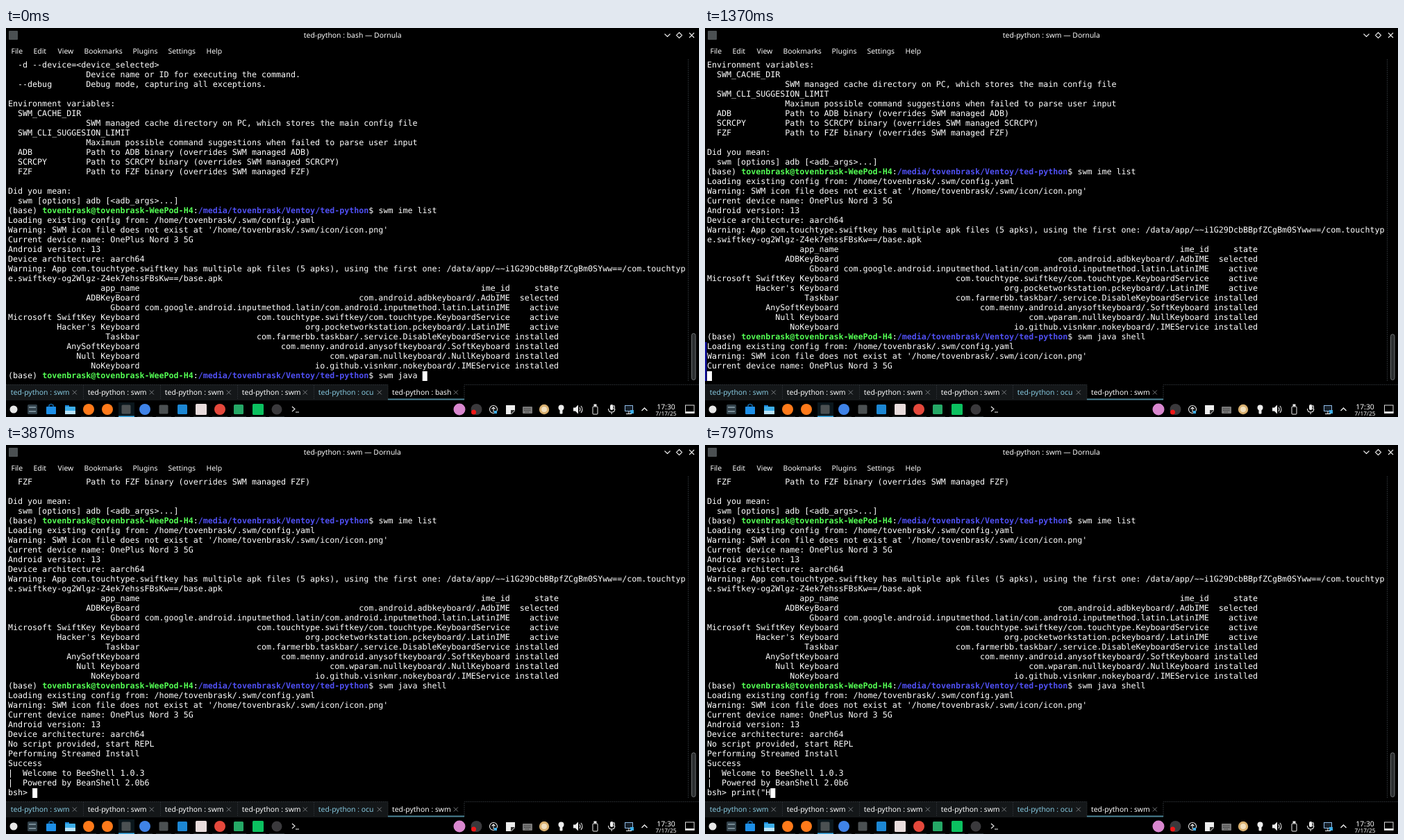
Write an HTML page that moves like this. It is 998 by 561 pixels and loops after 8000 ms.

```html
<!DOCTYPE html>
<html lang="en">
<head>
<meta charset="utf-8">
<title>Terminal</title>
<style>
  html, body { margin: 0; width: 100%; height: 100%; overflow: hidden; background: #000; }
  svg { display: block; width: 100%; height: 100%; }
  text { fill: #fcfcfc; white-space: pre; text-rendering: geometricPrecision; font: 10.4px "Noto Sans", sans-serif; }
  #screen text { font: 11.66px "DejaVu Sans Mono", monospace; fill: #fff; }
  #screen .host { fill: #54ff54; font-weight: bold; }
  #screen .path { fill: #5050f4; font-weight: bold; }
  .line { fill: none; stroke: #eee; stroke-width: 1.1; }
  .frame { fill: none; stroke: #282c30; stroke-width: 1; stroke-dasharray: 2 1; }
  .mid { text-anchor: middle; }
</style>
</head>
<body>
<svg viewBox="0 0 998 561">
  <rect width="998" height="561"/>
  <rect x="4" y="4" width="13" height="13" rx="1" fill="#4b5052"/>
  <text id="title" x="428.8" y="14"></text>
  <path class="line" d="M948.5 8.5l4 4 4-4M969.5 6.500l4 4-4 4-4-4zM984 7l7 7m0-7l-7 7"/>
  <g id="menu"></g>
  <g id="screen"></g>
  <path class="frame" d="M982.500 45V510"/>
  <rect id="thumb" x="987.5" width="5.500" rx="2.7" fill="#2b2e30" stroke="#75797b" stroke-width=".9"/>
  <g id="tabs"></g>
  <g id="taskbar"></g>
</svg>
<script>
const LOOP = 8000, ROWS = 33, ROW_H = 14, COL_W = 7.02, LEFT = 3, BOTTOM = 495;
const USER = 'tovenbrask', HOST = `${USER}@${USER}-WeePod-H4`, CWD = `/media/${USER}/Ventoy/ted-python`;
const PROMPT = `(base) ${HOST}:${CWD}$ `;
const $ = id => document.getElementById(id);

const startup = [
  `Loading existing config from: /home/${USER}/.swm/config.yaml`,
  `Warning: SWM icon file does not exist at '/home/${USER}/.swm/icon/icon.png'`,
  'Current device name: OnePlus Nord 3 5G',
  'Android version: 13',
  'Device architecture: aarch64'
];
const help = (name, about) => ('  ' + name).padEnd(16) + about;
const imeRow = ([app, id, state]) => `${app.padStart(27)} ${id.padStart(75)} ${state.padStart(9)}`;

const history = [
  '  -d --device=<device_selected>',
  help('', 'Device name or ID for executing the command.'),
  help('--debug', 'Debug mode, capturing all exceptions.'),
  '',
  'Environment variables:',
  '  SWM_CACHE_DIR',
  help('', 'SWM managed cache directory on PC, which stores the main config file'),
  '  SWM_CLI_SUGGESION_LIMIT',
  help('', 'Maximum possible command suggestions when failed to parse user input'),
  help('ADB', 'Path to ADB binary (overrides SWM managed ADB)'),
  help('SCRCPY', 'Path to SCRCPY binary (overrides SWM managed SCRCPY)'),
  help('FZF', 'Path to FZF binary (overrides SWM managed FZF)'),
  '',
  'Did you mean:',
  '  swm [options] adb [<adb_args>...]',
  PROMPT + 'swm ime list',
  ...startup,
  'Warning: App com.touchtype.swiftkey has multiple apk files (5 apks), using the first one: /data/app/~~i1G29DcbBBpfZCgBm0SYww==/com.touchtyp',
  'e.swiftkey-og2Wlgz-Z4ek7ehssFBsKw==/base.apk',
  ...[
    ['app_name', 'ime_id', 'state'],
    ['ADBKeyBoard', 'com.android.adbkeyboard/.AdbIME', 'selected'],
    ['Gboard', 'com.google.android.inputmethod.latin/com.android.inputmethod.latin.LatinIME', 'active'],
    ['Microsoft SwiftKey Keyboard', 'com.touchtype.swiftkey/com.touchtype.KeyboardService', 'active'],
    ["Hacker's Keyboard", 'org.pocketworkstation.pckeyboard/.LatinIME', 'active'],
    ['Taskbar', 'com.farmerbb.taskbar/.service.DisableKeyboardService', 'installed'],
    ['AnySoftKeyboard', 'com.menny.android.anysoftkeyboard/.SoftKeyboard', 'installed'],
    ['Null Keyboard', 'com.wparam.nullkeyboard/.NullKeyboard', 'installed'],
    ['NoKeyboard', 'io.github.visnkmr.nokeyboard/.IMEService', 'installed']
  ].map(imeRow)
];

// Times in ms at which keys are pressed and output lines appear.
const ENTER = 800, REPL = 3500;
const shellKeys = [130, 250, 370, 480, 600];
const printKeys = [7150, 7330, 7610, 7670, 7730, 7800, 7860, 7930];
const output = [...startup, 'No script provided, start REPL', 'Performing Streamed Install',
  'Success', '|  Welcome to BeeShell 1.0.3', '|  Powered by BeanShell 2.0b6'];
const outputTimes = [930, 1000, 1300, 1400, 1460, 1700, 1800, 3200, REPL, REPL];
const passed = (times, t) => times.filter(at => at <= t).length;

const escape = s => s.replace(/&/g, '&amp;').replace(/</g, '&lt;');
const text = (s, x, y, extra = '') => `<text x="${x}" y="${y}" ${extra}>${s}</text>`;
const rect = (x, y, w, h, fill, extra = '') => `<rect x="${x}" y="${y}" width="${w}" height="${h}" fill="${fill}" ${extra}/>`;
const circle = (x, y, r, fill, extra = '') => `<circle cx="${x}" cy="${y}" r="${r}" fill="${fill}" ${extra}/>`;
const line = (d, extra = '') => `<path class="line" d="${d}" ${extra}/>`;
const markup = s => escape(s)
  .replace(HOST, `<tspan class="host">${HOST}</tspan>`)
  .replace(CWD, `<tspan class="path">${CWD}</tspan>`);

function drawTabs(job) {
  const edges = [0, 111, 222, 333, 443, 550, 660];
  const jobs = ['swm', 'swm', 'swm', 'swm', 'ocu', job];
  $('tabs').innerHTML = rect(0, 514, 550, 23, '#141719')
    + '<path class="frame" d="M0 514.500H550V536M660 536V514.500H998"/>'
    + rect(550, 534.5, 110, 2, '#4d8698')
    + jobs.map((name, i) => {
      const x = edges[i] + (i === 5 ? 6 : 6.8), close = edges[i + 1] - 12.2;
      const tint = i === 0 || i === 4 ? 'style="fill:#86c8de"' : '';
      return (i && i < 5 ? `<path class="frame" d="M${edges[i]}.500 515V536"/>` : '')
        + text(`ted-python : ${name}`, x, 529.4, tint)
        + line(`M${close - 3} 522.500l6 6m0-6l-6 6`, 'style="stroke:#858a8d;stroke-width:.9"');
    }).join('');
}

function drawTaskbar() {
  const disc = (x, fill, r = 8) => circle(x, 550, r, fill);
  const tile = (x, fill, w = 15) => rect(x - w / 2, 550 - w / 2, w, w, fill, 'rx="1.5"');
  $('taskbar').innerHTML = [
    rect(162, 540, 23, 21, '#0a161c'), rect(162, 559.5, 23, 1.5, '#3daee9'),
    ...[108, 135, 189, 216, 243, 270, 297, 324, 352, 379].map(x => rect(x, 560, 22, 1, '#242b2f')),
    disc(11, '#e8e8e8', 5.5),
    tile(38, '#33424b', 14), line('M33 547H43M33 553H43', 'style="stroke:#bcd3df"'),
    rect(58, 546, 14, 11, '#1d8fe8', 'rx="1"'), line('M62 546v-2q3-3 6 0v2', 'style="stroke:#1d8fe8"'),
    rect(85, 544, 6, 4, '#1784d8'), rect(85, 546, 15, 11, '#3daee9', 'rx="1"'), rect(85, 552, 15, 5, '#b9e3fa'),
    disc(119, '#ff7a1a'), disc(146, '#ff7a1a'),
    tile(173, '#4b5052', 13), disc(200, '#3f83e8'), tile(227, '#4b5052', 13),
    tile(254, '#1c87d4', 14), tile(281, '#e8dcdc', 16), disc(308, '#e5483c'),
    tile(335, '#25a866', 14), tile(363, '#0bc160', 16), disc(390, '#3a393c', 7.5),
    line('M412 546l4 3.500-4 3.500M417 554h5'),
    disc(653, '#d987cf', 8.5), disc(677.5, '#3a393c', 8), circle(673.5, 554, 3.5, '#f01818'),
    circle(702, 550, 5.5, 'none', 'stroke="#eee" stroke-width="1.1"'), line('M702 554v-7m-2.500 2.500l2.500-2.500 2.500 2.500'), rect(703, 552, 4, 4, '#3daee9'),
    '<path d="M720 544h13v8l-5 5h-8z" fill="#eee"/><path d="M727 557v-6h6z" fill="#333"/>',
    rect(744, 546, 14, 10, '#777', 'rx="1"'), line('M746 549h10M746 551.500h10M748 554h6', 'style="stroke:#222;stroke-dasharray:1 1"'),
    disc(775, '#d9b070', 7.2), disc(775, '#f1dfbe', 4),
    circle(799.5, 547.5, 4, '#eee'), rect(797.5, 550, 4, 6.5, '#eee', 'rx="1"'),
    '<path d="M817 547.500h3l4-4v13l-4-4h-3z" fill="#eee"/>', line('M826 547q2 3 0 6m2-8q4 5 0 10'),
    rect(845, 546, 7, 11, 'none', 'stroke="#eee" rx="1"'), rect(846.5, 542.5, 4, 3, '#eee'),
    rect(870, 543, 4.5, 8, '#eee', 'rx="2.2"'), line('M867.500 549q0 5 4.700 5t4.700-5M872.200 554v3M875 544q3 3 0 6'),
    rect(891.5, 544.5, 11, 8, '#16202a', 'stroke="#8eb9e4"'), line('M897 553v3.500m-4 0h8'), rect(899, 551, 5, 5, '#3daee9'),
    line('M915.500 552l4-4 4 4', 'style="stroke-width:1.4"'),
    text('17:30', 950.5, 549.7, 'class="mid"'),
    text('7/17/25', 950.5, 558.6, 'class="mid" style="font-size:8.3px"'),
    rect(978.5, 544, 12.5, 11.5, 'none', 'stroke="#ddd"'), rect(978, 553, 13.5, 2.5, '#ddd')
  ].join('');
}

function drawScreen(lineCount, tail, running) {
  const rows = [...history, ...(running ? [PROMPT + 'swm java shell'] : []), ...output.slice(0, lineCount), tail].slice(-ROWS);
  const last = rows.length - 1;
  const top = row => BOTTOM + (row - last) * ROW_H;
  const fresh = running && !tail;
  $('screen').innerHTML =
    (fresh ? rect(0, top(last - lineCount), 2.5, (lineCount + 1) * ROW_H, '#10109c') : '')
    + rows.map((row, i) => text(markup(row), LEFT, top(i) + 10)).join('')
    + rect(LEFT + tail.length * COL_W, BOTTOM, COL_W, 14, '#fff');
  const thumbTop = 440.5 + (running ? lineCount + 1 : 0) * 0.3;
  $('thumb').setAttribute('y', thumbTop);
  $('thumb').setAttribute('height', 507.5 - thumbTop);
}

let shown = '';
function render(now) {
  const t = now % LOOP;
  const running = t >= ENTER;
  const lineCount = passed(outputTimes, t);
  const tail = !running ? PROMPT + 'swm java ' + 'shell'.slice(0, passed(shellKeys, t))
    : t < REPL ? '' : 'bsh> ' + 'print("H'.slice(0, passed(printKeys, t));
  const state = [running, lineCount, tail].join();
  if (state !== shown) {
    shown = state;
    const job = running ? 'swm' : 'bash';
    $('title').textContent = `ted-python : ${job} — Dornula`;
    drawTabs(job);
    drawScreen(lineCount, tail, running);
  }
  requestAnimationFrame(frame);
}
const start = performance.now();
const frame = () => render(performance.now() - start);

const menu = { File: 7.5, Edit: 39.5, View: 74.5, Bookmarks: 112.5, Plugins: 182.5, Settings: 233.5, Help: 288.5 };
$('menu').innerHTML = Object.entries(menu).map(([label, x]) => text(label, x, 37)).join('');
drawTaskbar();
frame();
</script>
</body>
</html>
```
